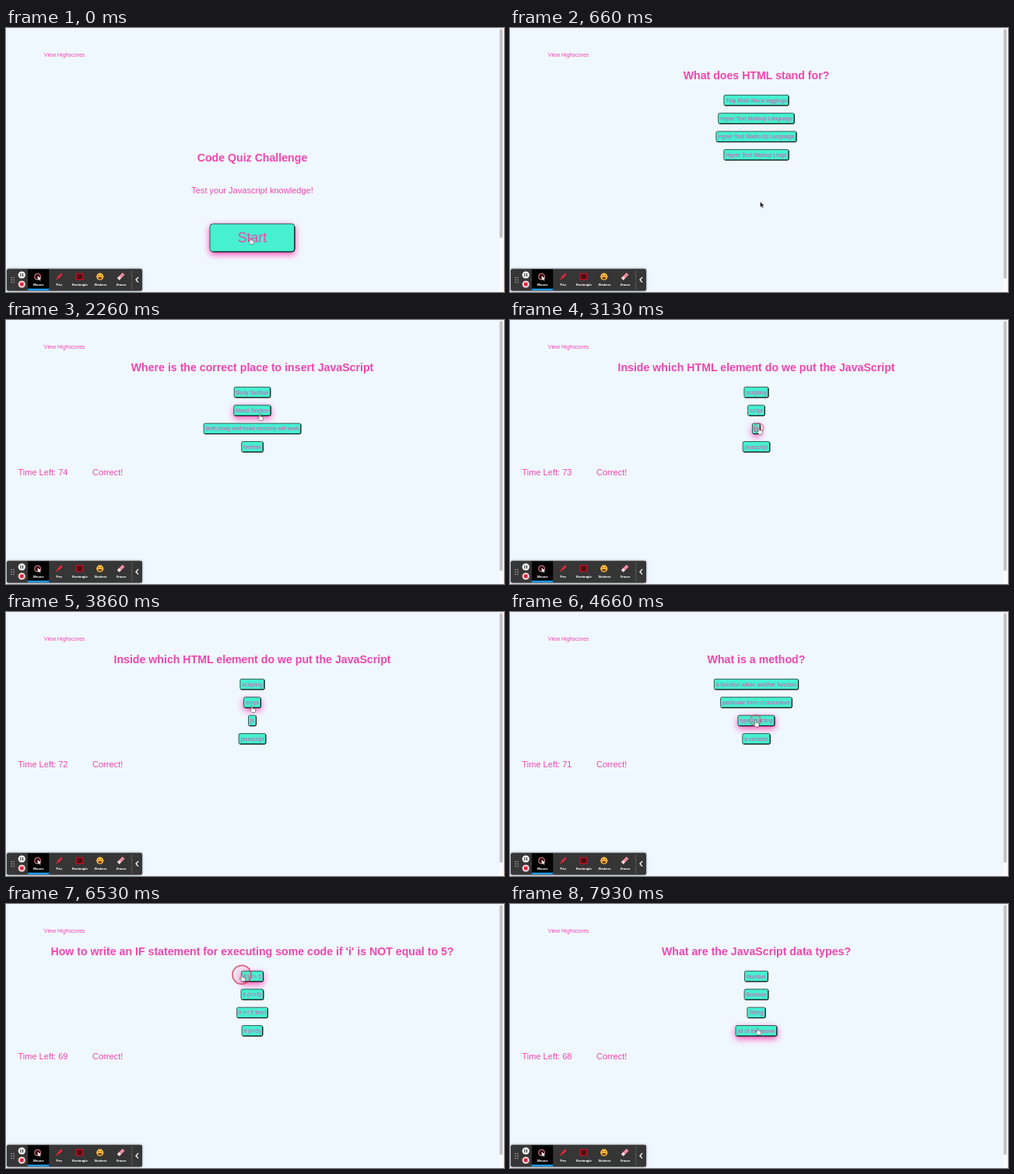
An HTML page for the animation above (8000 ms loop, 640x340 px).

```html
<!DOCTYPE html>
<html lang="en">
<head>
<meta charset="utf-8">
<title>Code Quiz Challenge</title>
<style>
html, body { margin: 0; width: 100%; height: 100%; overflow: hidden; background: #f0f8ff; }
svg { display: block; width: 640px; height: 340px; }
text { font-family: "Liberation Sans", Arial, sans-serif; fill: #f046ae; }
.mid { text-anchor: middle; }
.tool text { font: bold 4.4px Roboto, sans-serif; fill: #fff; text-anchor: middle; }
.hover { filter: drop-shadow(0 3px 4px #ff4cb4); }
</style>
</head>
<body>
<svg id="stage" viewBox="0 0 640 340">
  <rect width="640" height="340" fill="#f0f8ff"/>
  <rect x="633" width="7" height="340" fill="#fafafa"/>
  <path d="M633.2 0V340M639.8 0V340" stroke="#e6e8ea" stroke-width=".5"/>
  <rect id="thumb" x="634.4" y="1" width="3.8" rx="1.9" fill="#c1c1c1"/>
  <text x="48.8" y="37.2" font-size="7.08">View Highscores</text>
  <g id="screens"></g>
  <text id="timer" x="15.4" y="200" font-size="11.05"></text>
  <text id="result" x="111" y="200" font-size="11.05">Correct!</text>

  <g class="tool">
    <rect x="1" y="310.3" width="174" height="28.2" rx="2" fill="#363636" style="filter:drop-shadow(0 .5px 1.5px #0008)"/>
    <path d="M7 321.5h0M10 321.5h0M7 324.5h0M10 324.5h0M7 327.5h0M10 327.5h0" stroke="#c8c8c8" stroke-width="1.4" stroke-linecap="round"/>
    <circle cx="20.3" cy="318" r="4.6" fill="#fff"/>
    <path d="M19 315.8v4.4M21.6 315.8v4.4" stroke="#333" stroke-width="1.2"/>
    <circle cx="20.3" cy="330" r="4.6" fill="#f9d5da"/>
    <rect x="18" y="327.7" width="4.6" height="4.6" rx=".8" fill="#e0263c"/>
    <rect x="28" y="310.8" width="27.2" height="27.2" fill="#000"/>
    <rect x="28" y="335.6" width="27.2" height="2.4" fill="#1d9bf0"/>
    <circle cx="40.6" cy="320.2" r="4" fill="#3a0d14" stroke="#ee8c9a" stroke-width="1"/>
    <path d="M40.6 319.2l.4 5.8 1.4-1.4 1.1 2 1-.6-1.1-1.8 1.8-.4z" fill="#fff"/>
    <g transform="rotate(45 68.3 320)">
      <rect x="66.9" y="315" width="2.8" height="7.4" rx=".7" fill="#e4253c"/>
      <path d="M66.9 323h2.8l-1.4 3z" fill="#e4253c"/>
    </g>
    <rect x="90.4" y="316.2" width="8.2" height="7.8" fill="#4a1016" stroke="#c4152a" stroke-width="1.2"/>
    <circle cx="120.8" cy="320.2" r="4.6" fill="#f8b93a"/>
    <path d="M118.3 319.2q.9-1.4 1.8 0M121.6 319.2q.9-1.4 1.8 0" fill="none" stroke="#5b3510" stroke-width=".7"/>
    <path d="M117.9 320.9h5.8q-.7 2.9-2.9 2.9t-2.9-2.9z" fill="#7a3a16"/>
    <g transform="rotate(45 147.5 320)">
      <rect x="145.6" y="315" width="4" height="6.8" rx=".6" fill="#ee8f9f"/>
      <rect x="145.6" y="321.3" width="4" height="3.4" rx=".6" fill="#f8dfe2"/>
    </g>
    <path d="M161.8 312V337" stroke="#777" stroke-width=".6"/>
    <path d="M170 321l-3 3.3 3 3.3" fill="none" stroke="#fff" stroke-width="1.3"/>
    <text x="41.8" y="332">Mouse</text>
    <text x="68.2" y="332">Pen</text>
    <text x="95" y="332">Rectangle</text>
    <text x="121.5" y="332">Stickers</text>
    <text x="148.2" y="332">Eraser</text>
  </g>

  <circle id="ring"/>
  <g id="cursor" stroke="#222" stroke-width=".5" stroke-linejoin="round" fill="#fff">
    <path id="hand" d="M-.8 .6Q-.8-.4 0-.4T.8 .6V3.2Q1.6 2.7 2.2 3.4 3 3 3.4 3.8 4.6 3.5 4.6 4.7V6.4Q4.4 7.6 3.8 8.6H.2Q-1.2 7-2.4 5.2-2.6 4-1.6 4.4L-.8 5.2z"/>
    <path id="arrow" d="M0 0V7.6L1.8 6 3 8.8 4.2 8.3 3 5.6H5.4z" fill="#111" stroke="#fff"/>
  </g>
</svg>
<script>
const LOOP = 8000, CX = 316.5;
const $ = id => document.getElementById(id);

const quiz = [
  ["What does HTML stand for?", "Tidy Moth Mens leggings", "Hyper Text Markup Language",
    "Hyper Text Made-Up Language", "Hyper Text Markup Lingo"],
  ["Where is the correct place to insert JavaScript", "Body Section", "Head Section",
    "Both body and head sections will work", "Neither"],
  ["Inside which HTML element do we put the JavaScript", "scripting", "script", "js", "javascript"],
  ["What is a method?", "a function within another function", "particular form of procedure",
    "type of acting", "a variable"],
  ["How to write an IF statement for executing some code if 'i' is NOT equal to 5?",
    "if i <> 5", "if (i<>5)", "if i=! 5 then", "if (i!=5)"],
  ["What are the JavaScript data types?", "Number", "Boolean", "String", "all of the above"]
];

// Each click opens the next screen.
const clicks = [300, 1930, 3050, 4565, 6340, 7300];
const firstTick = 1300;

// Pointer stops: time, x, y
const path = [
  [0, 314, 270], [420, 314, 270], [1000, 334, 146], [1330, 333, 140], [1600, 333, 140],
  [1850, 330, 120], [2260, 326, 121], [2600, 326, 122], [2900, 320, 139], [3200, 320, 139],
  [3700, 316, 121], [4100, 316, 121], [4420, 316, 140], [4900, 315, 139], [5500, 312, 118],
  [6100, 303, 92], [6650, 303, 91], [7150, 316, 161], [7400, 316, 161],
  [7600, 322, 151], [7920, 318, 160], [8000, 318, 160]
];

function el(parent, tag, attrs, text) {
  const node = document.createElementNS("http://www.w3.org/2000/svg", tag);
  for (const k in attrs) node.setAttribute(k, attrs[k]);
  if (text) node.textContent = text;
  return parent.appendChild(node);
}

const label = (parent, text, y, size, weight = "normal") =>
  el(parent, "text", { class: "mid", x: CX, y, "font-size": size, "font-weight": weight }, text);

function button(parent, text, cy, size, h, padX, radius) {
  const g = el(parent, "g", {});
  const t = label(g, text, cy + size * .345, size);
  const w = t.getComputedTextLength() + padX;
  const x = CX - w / 2, y = cy - h / 2;
  const box = { x: x + .45, y: y + .45, width: w - .9, height: h - .9, rx: radius };
  g.insertBefore(el(g, "rect", { ...box, fill: "#46f0d0", stroke: "#2c4a4a", "stroke-width": .9 }), t);
  // Darker lower right edge
  g.insertBefore(el(g, "path", {
    d: `M${x + radius} ${y + h - .45}H${x + w - radius}Q${x + w - .45} ${y + h - .45} ${x + w - .45} ${y + h - radius}V${y + radius}`,
    fill: "none", stroke: "#000", "stroke-width": .9
  }), t);
  return { g, x, y, w, h };
}

function startScreen() {
  const g = el($("screens"), "g", {});
  label(g, "Code Quiz Challenge", 172, 14.17, "bold");
  label(g, "Test your Javascript knowledge!", 212.5, 11.05);
  return { g, buttons: [button(g, "Start", 270.2, 17.7, 37, 72.5, 4)] };
}

function quizScreen([title, ...answers]) {
  const g = el($("screens"), "g", {});
  label(g, title, 66, 14.17, "bold");
  return { g, buttons: answers.map((a, i) => button(g, a, 93.1 + i * 23.4, 7.08, 14.4, 5.7, 1.8)) };
}

const screens = [startScreen(), ...quiz.map(quizScreen)];

function pointer(t) {
  const i = Math.max(1, path.findIndex(p => p[0] >= t));
  const [t0, x0, y0] = path[i - 1], [t1, x1, y1] = path[i];
  const u = (t - t0) / (t1 - t0), e = u * u * (3 - 2 * u);
  return [x0 + (x1 - x0) * e, y0 + (y1 - y0) * e];
}

const show = (node, on) => node.setAttribute("display", on ? "inline" : "none");

function drawRing(t, x, y) {
  const age = t - Math.max(...clicks.filter(c => c <= t));
  const on = age >= 0 && age < 330;
  show($("ring"), on);
  if (!on) return;
  const grow = Math.min(1, age / 190);
  const fade = Math.min(1, (330 - age) / 130);
  const attrs = {
    cx: x, cy: y, r: 2 + 10 * grow, opacity: fade,
    fill: "rgba(240,90,130,.12)", stroke: `rgba(215,60,95,${.4 + .4 * grow})`,
    "stroke-width": .7 + grow
  };
  for (const k in attrs) $("ring").setAttribute(k, attrs[k]);
}

function draw(t) {
  const step = clicks.filter(c => c <= t).length;
  const [x, y] = pointer(t);
  let over = false;
  screens.forEach((s, i) => {
    show(s.g, i === step);
    for (const b of s.buttons) {
      const hit = i === step && x >= b.x && x <= b.x + b.w && y >= b.y && y <= b.y + b.h;
      b.g.setAttribute("class", hit ? "hover" : "");
      over = over || hit;
    }
  });
  $("thumb").setAttribute("height", step ? 322 : 269.5);
  $("timer").textContent = t < firstTick ? "" : "Time Left: " + (74 - Math.floor((t - firstTick) / 1000));
  show($("result"), step > 1);
  $("cursor").setAttribute("transform", `translate(${x} ${y})`);
  show($("hand"), over);
  show($("arrow"), !over);
  drawRing(t, x, y);
}

const begin = performance.now();
function tick() {
  draw((performance.now() - begin) % LOOP);
  requestAnimationFrame(tick);
}
tick();
</script>
</body>
</html>
```
